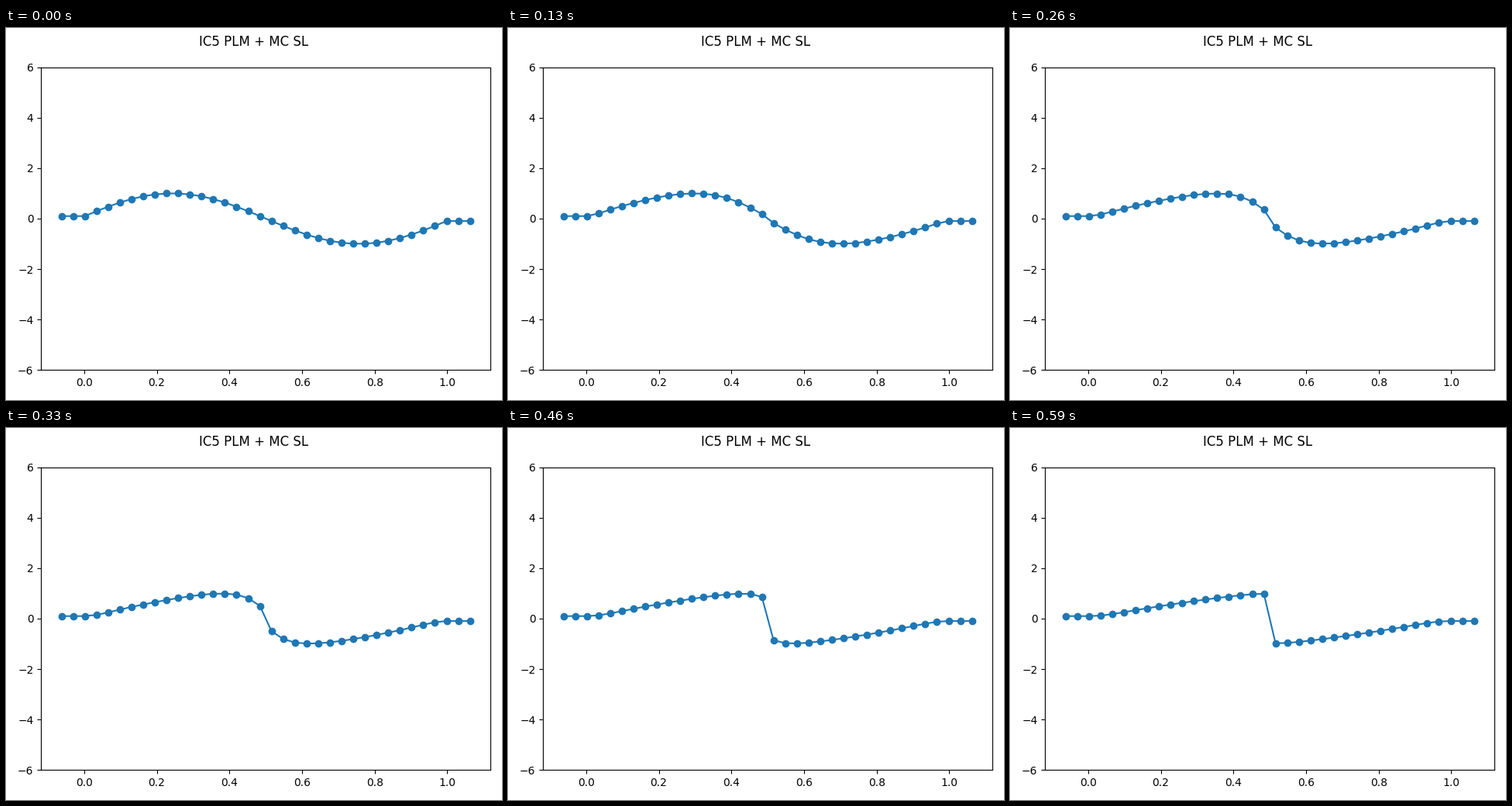
These frames come from a looping animation (640x480 px, 660 ms). A matplotlib script:

```python
import numpy as np
import matplotlib.pyplot as plt
from matplotlib.animation import FuncAnimation

CELLS = 32
GHOSTS = 2
CFL = 0.9
STEPS = 10
TICK = 10            # ms per drawn frame
TICKS_PER_STEP = 6.6
FRAMES = 66


def fill_ghosts(u):
    """Outflow boundaries."""
    u[:GHOSTS] = u[GHOSTS]
    u[-GHOSTS:] = u[-GHOSTS - 1]


def limited_slope(u):
    slope = np.zeros_like(u)
    diff = np.diff(u)
    left, right = diff[:-1], diff[1:]
    steepest = np.minimum(2 * left, 2 * right)
    slope[1:-1] = np.maximum(0, np.minimum(steepest, (left + right) / 2))
    return slope


def riemann_flux(ul, ur):
    """Exact Godunov flux of Burgers' equation."""
    shock = np.where(ul + ur > 0, ul, ur)
    fan = np.where(ul > 0, ul, np.where(ur < 0, ur, 0))
    return 0.5 * np.where(ul > ur, shock, fan) ** 2


def advance(u):
    ratio = CFL / np.abs(u).max()
    slope = limited_slope(u)
    at_right = u + 0.5 * (1 - ratio * u) * slope
    at_left = u - 0.5 * (1 + ratio * u) * slope
    flux = riemann_flux(at_right[:-1], at_left[1:])
    new = u.copy()
    new[1:-1] -= ratio * np.diff(flux)
    fill_ghosts(new)
    return new


def solve():
    index = np.arange(-GHOSTS, CELLS + GHOSTS)
    u = np.sin(2 * np.pi * (index + 0.5) / CELLS)
    fill_ghosts(u)
    states = [u]
    for _ in range(STEPS - 1):
        states.append(advance(states[-1]))
    return states


states = solve()
margin = GHOSTS / CELLS
x = np.linspace(-margin, 1 + margin, CELLS + 2 * GHOSTS)

fig, ax = plt.subplots(figsize=(6.4, 4.8), dpi=100)
fig.suptitle("IC5 PLM + MC SL", y=1 - 22.6 / 480, va="baseline")
line, = ax.plot(x, states[0], "o-")
ax.set_ylim(-6, 6)
fig.tight_layout()
fig.subplots_adjust(top=1 - 50.5 / 480)


def update(frame):
    # step times are rounded to the nearest tick
    line.set_ydata(states[int((frame + 0.5) / TICKS_PER_STEP)])
    return line,


anim = FuncAnimation(fig, update, frames=FRAMES, interval=TICK,
                     repeat=True, repeat_delay=0)
plt.show()
```
